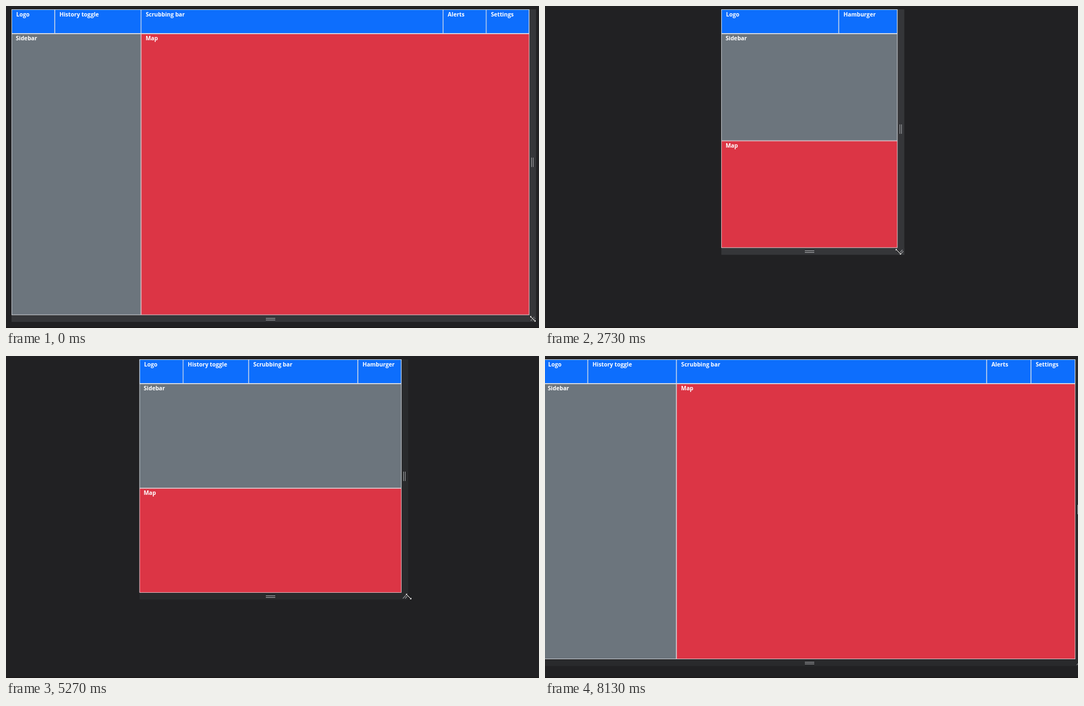
Write an HTML page with a canvas that moves like this. It is 962 px wide and 582 px high and loops after 8740 ms.

```html
<!DOCTYPE html>
<html lang="en">
<head>
<meta charset="utf-8">
<title>Responsive layout</title>
<style>
  html, body { margin: 0; width: 100%; height: 100%; overflow: hidden; background: #212123; }
  canvas { display: block; }
</style>
</head>
<body>
<canvas id="stage" width="962" height="582"></canvas>
<script>
const ctx = document.getElementById('stage').getContext('2d');
const LOOP = 8740, STEP = 1000 / 15, TOP = 6, HEADER = 44, CENTER = 477.25;
const BLUE = '#0d6efd', GRAY = '#6c757d', RED = '#dc3545', BORDER = '#dee2e6';

// time, left edge, bottom edge, cursor offset from the corner grip
const KEYS = [
  [130, 10, 558.5, 0], [1000, 61, 530, 0], [1800, 188.7, 483, -1], [1930, 214, 470, -2],
  [2730, 317.7, 437.3, -5], [2870, 347, 433, -4], [3730, 450, 400.5, 5], [4000, 450, 400.5, 5],
  [4330, 425.3, 403, 7], [4870, 336, 409, 7], [5270, 240, 428, 6.5], [5800, 122, 488, 5],
  [6470, 24, 531.5, 1.5], [6730, 13, 535, 1], [7130, -2.7, 548, 1]
];

// Column spans out of 12 for each breakpoint
const LAYOUTS = [
  { min: 661, split: 3, cols: { 'Logo': 1, 'History toggle': 2, 'Scrubbing bar': 7, 'Alerts': 1, 'Settings': 1 } },
  { min: 512, split: 4, cols: { 'Logo': 2, 'History toggle': 3, 'Scrubbing bar': 5, 'Alerts': 1, 'Settings': 1 } },
  { min: 384, cols: { 'Logo': 2, 'History toggle': 3, 'Scrubbing bar': 5, 'Hamburger': 2 } },
  { min: 0, cols: { 'Logo': 8, 'Hamburger': 4 } }
];

// Smooth interpolation that never overshoots the key values
function valueAt(time, field) {
  const last = KEYS.length - 1;
  if (time <= KEYS[0][0]) return KEYS[0][field];
  if (time >= KEYS[last][0]) return KEYS[last][field];
  const i = KEYS.findIndex(key => key[0] > time) - 1;
  const slope = j => j < 0 || j >= last ? 0 :
    (KEYS[j + 1][field] - KEYS[j][field]) / (KEYS[j + 1][0] - KEYS[j][0]);
  const tangent = j => {
    const a = slope(j - 1), b = slope(j);
    return a * b > 0 ? 2 * a * b / (a + b) : 0;
  };
  const span = KEYS[i + 1][0] - KEYS[i][0], u = (time - KEYS[i][0]) / span, v = 1 - u;
  return v * v * (1 + 2 * u) * KEYS[i][field] + u * u * (3 - 2 * u) * KEYS[i + 1][field]
    + span * u * v * (v * tangent(i) - u * tangent(i + 1));
}

function rect(x, y, w, h, color) {
  ctx.fillStyle = color;
  ctx.fillRect(x, y, w, h);
}

function lines(color, width, ...segments) {
  ctx.strokeStyle = color;
  ctx.lineWidth = width;
  ctx.beginPath();
  for (const [x1, y1, x2, y2] of segments) {
    ctx.moveTo(x1, y1);
    ctx.lineTo(x2, y2);
  }
  ctx.stroke();
}

function cell(label, x, y, w, h, color, padX = 7.7, baseline = 12.3) {
  rect(x, y, w, h, color);
  ctx.strokeStyle = BORDER;
  ctx.lineWidth = 0.8;
  ctx.strokeRect(x + 0.4, y + 0.4, w - 0.8, h - 0.8);
  ctx.fillStyle = '#fff';
  ctx.fillText(label, x + padX, y + baseline);
}

function drawPage(left, width, height) {
  const layout = LAYOUTS.find(item => width >= item.min);
  const cols = Object.entries(layout.cols), [lastLabel, lastSpan] = cols[cols.length - 1];
  const labelWidth = lastLabel === 'Settings' ? 40 : 57;
  const contentWidth = width * (12 - lastSpan) / 12 + 8.3 + labelWidth;
  const scale = Math.min(1, width / contentWidth);

  ctx.save();
  rect(left, TOP, width, height, '#fff');
  ctx.beginPath();
  ctx.rect(left, TOP, width, height);
  ctx.clip();
  ctx.translate(left, TOP);
  ctx.scale(scale, scale);
  ctx.font = '700 10.2px "Open Sans", "Noto Sans", sans-serif';

  let x = 0;
  for (const [label, span] of cols) {
    const w = width * span / 12;
    cell(label, x, 0, w, HEADER, BLUE, 8.5, 13);
    x += w;
  }
  ctx.strokeRect(0.5, 0.5, width - 1, HEADER - 1);

  const rest = height - HEADER;
  if (layout.split) {
    const side = width * layout.split / 12;
    cell('Sidebar', 0, HEADER, side, rest, GRAY);
    cell('Map', side, HEADER, width - side, rest, RED, 8.3);
  } else {
    cell('Sidebar', 0, HEADER, width, rest / 2, GRAY);
    cell('Map', 0, HEADER + rest / 2, width, rest / 2, RED);
  }
  ctx.restore();
}

function drawHandles(left, right, bottom, color) {
  rect(right, TOP, 12.3, bottom + 12.5 - TOP, color);
  rect(left, bottom, right + 12.3 - left, 12.5, color);
  const x = Math.round(right + 5.5), y = Math.round((TOP + bottom) / 2);
  lines('#a4a6a9', 1, [x - 1.5, y - 8, x - 1.5, y + 9], [x + 1.5, y - 8, x + 1.5, y + 9]);
  const by = Math.round(bottom + 7);
  lines('#b4b6b9', 1, [469, by - 1.5, 486, by - 1.5], [469, by + 1.5, 486, by + 1.5]);
  const gx = right + 6.5, gy = bottom + 7;
  lines('#a4a6a9', 1.1, [gx - 4, gy + 3.5, gx + 2.5, gy - 3.5], [gx, gy + 3.5, gx + 4, gy - 1]);
}

function drawCursor(x, y) {
  ctx.save();
  ctx.translate(x, y);
  lines('#000', 2.6, [-4, -4, 4, 4]);
  lines('#fff', 1.1, [-4, -4, 4, 4]);
  for (const s of [-1, 1]) {
    ctx.beginPath();
    ctx.moveTo(5 * s, 5 * s);
    ctx.lineTo(1.8 * s, 5 * s);
    ctx.lineTo(5 * s, 1.8 * s);
    ctx.closePath();
    ctx.strokeStyle = '#000';
    ctx.lineWidth = 0.8;
    ctx.stroke();
    ctx.fillStyle = '#fff';
    ctx.fill();
  }
  ctx.restore();
}

function draw(now) {
  const loopTime = now % LOOP;
  const time = Math.floor((loopTime + 4) / STEP) * STEP;
  const left = valueAt(time, 1), bottom = valueAt(time, 2);
  const right = 2 * CENTER - left;

  rect(0, 0, 962, 582, '#212123');
  rect(0, 580, 962, 2, '#1c1a1a');
  drawHandles(left, right, bottom, time < 4660 ? '#353639' : '#292a2c');
  drawPage(left, right - left, bottom - TOP);
  if (time < 7500) drawCursor(right + 6.5 + valueAt(time, 3), bottom + 7);
  requestAnimationFrame(draw);
}
requestAnimationFrame(draw);
</script>
</body>
</html>
```
